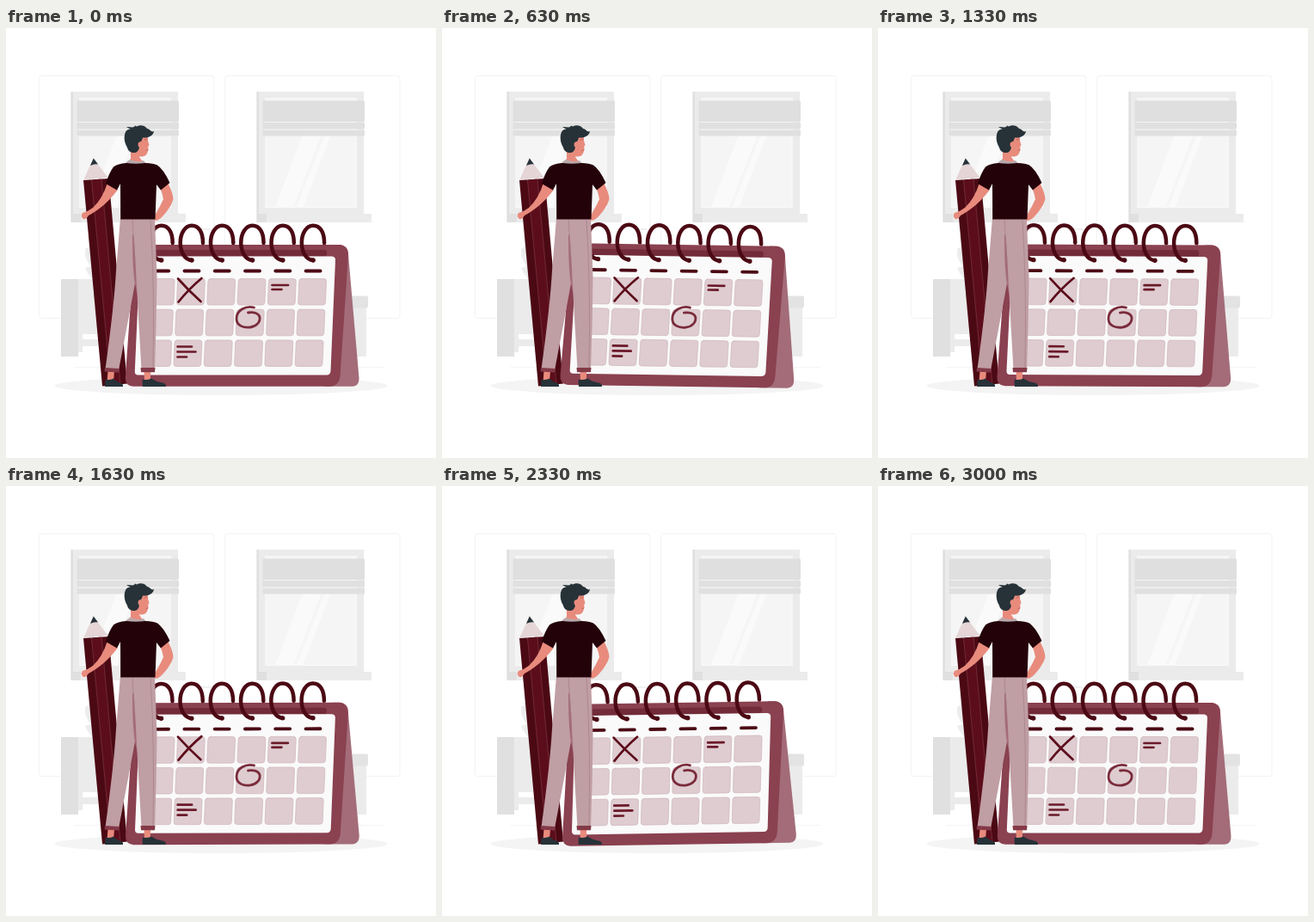
An HTML page with a canvas for the animation above (3040 ms loop, 500 by 500 pixels).

```html
<!DOCTYPE html>
<html lang="en">
<head>
<meta charset="utf-8">
<title>Desk calendar</title>
<style>
html, body { margin: 0; width: 100%; height: 100%; overflow: hidden; background: #fff; }
canvas { display: block; width: 500px; height: 500px; }
</style>
</head>
<body>
<canvas id="stage"></canvas>
<script>
const canvas = document.getElementById('stage');
const dpr = window.devicePixelRatio || 1;
canvas.width = canvas.height = 500 * dpr;
const ctx = canvas.getContext('2d');

const LOOP = 3040, SWING = 3, FPS = 24;
const DARK = '#4b0914', WINE = '#5c0d1b', BOARD = '#8a4150', SIDE = '#a36c78';
const PANTS = '#bf9ea4', SKIN = '#e88b7d', INK = '#263238', SHIRT = '#24020a';

function fill(d, color) {
  ctx.fillStyle = color;
  ctx.fill(new Path2D(d));
}

function line(d, color, width) {
  ctx.strokeStyle = color;
  ctx.lineWidth = width;
  ctx.stroke(new Path2D(d));
}

function box(x, y, w, h, color) {
  ctx.fillStyle = color;
  ctx.fillRect(x, y, w, h);
}

function round(x, y, w, h, r, color) {
  ctx.beginPath();
  ctx.roundRect(x, y, w, h, r);
  ctx.fillStyle = color;
  ctx.fill();
}

function drawWindow(x) {
  ctx.save();
  ctx.translate(x, 0);
  ctx.beginPath();
  ctx.roundRect(-37, 55.5, 203.5, 282, 3);
  ctx.strokeStyle = '#f3f3f3';
  ctx.lineWidth = 1;
  ctx.stroke();
  box(0, 74, 124.5, 142, '#ebebeb');
  box(0, 74, 2.5, 142, '#e0e0e0');
  box(0, 216, 133.5, 10, '#ebebeb');
  box(0, 216, 11.5, 10, '#e0e0e0');
  box(9.5, 81, 106.5, 128, '#f5f5f5');
  box(115, 81, 1, 128, '#fafafa');
  box(9.5, 208, 106.5, 1, '#fafafa');
  fill('M53 125H75L43 208H21.500Z', '#fafafa');
  fill('M79 125H86L54 208H46Z', '#fafafa');
  round(7, 84.5, 118.5, 24.5, 1.5, '#dfdfdf');
  round(7, 110, 118.5, 7.5, 1, '#e0e0e0');
  round(7, 118.7, 118.5, 6.8, 1, '#e0e0e0');
  ctx.restore();
}

function drawRoom() {
  box(0, 0, 500, 500, '#fff');
  drawWindow(75.5);
  drawWindow(291.5);

  fill('M92 257C97 254 106 256 110 260V292H101C97 289 94 284 92 279L98 277C95 272 93 268 92 265Z', '#ededed');
  box(84, 292, 34, 64, '#ebebeb');
  box(84, 362, 34, 8, '#ebebeb');
  box(84, 297, 5, 80, '#ebebeb');
  box(64, 292, 20, 90, '#e0e0e0');
  line('M226 234H238', '#ededed', 1.5);
  box(390, 325, 29, 57, '#ebebeb');
  round(388, 311.5, 33, 14, 2, '#e3e3e3');
  line('M80 394.5H440', '#f5f5f5', 1);

  ctx.beginPath();
  ctx.ellipse(250, 416, 193.5, 11, 0, 0, Math.PI * 2);
  ctx.fillStyle = '#f4f4f4';
  ctx.fill();
}

function drawPencil() {
  fill('M90 177L119.500 175L141 413.500L112 416.500Z', DARK);
  fill('M99.500 177L111 175.500L133 414.500L122 415.500Z', WINE);
  line('M99.500 177L122 415.500M111 175.500L133 414.500', '#7d3843', 0.7);
  fill('M101.500 151.500L90 177Q95 174.500 99.500 176.500Q105 173.500 111 175.500Q115 173 119.500 175Z', '#e5d5d7');
  fill('M101.800 151.500L98 160Q103 157.500 107 158.500Z', INK);
}

function drawCell(x, y) {
  const w = 31.8, h = 30.6;
  ctx.save();
  ctx.transform(1, 0, -0.044, 1, x, y);
  ctx.beginPath();
  ctx.roundRect(0, 0, w, h, 3);
  ctx.fillStyle = '#deccd0';
  ctx.fill();
  ctx.strokeStyle = '#cfb6bb';
  ctx.lineWidth = 0.7;
  ctx.stroke();
  ctx.restore();
}

function drawCalendar() {
  fill('M380 252H389Q396 253 398 263L410.500 407Q411 416 403 416.800H370Z', SIDE);
  fill('M158 252H388Q398.500 253 398 264L388.500 405Q387 416.500 376 416.800H148Q138 416 138.800 406L149 262Q150 252 158 252Z', BOARD);
  round(160, 258, 213, 7.5, 3, '#722b39');
  fill('M160 265.500H379Q383.300 266 383 270L377.500 399Q377 403.300 373 403.500H153Q149.500 403 149.800 399L155.500 270Q156 266 160 265.500Z', '#fafafa');

  for (let row = 0; row < 3; row++)
    for (let col = 0; col < 6; col++)
      drawCell(164.4 + col * 35.3 - row * 1.75, 291.5 + row * 35.7);

  line('M200 291.500Q213 306 226.500 318M227.500 291Q213 303 200.500 318.500', WINE, 2.7);
  line('M309.500 299H328M309.500 304H320.500', '#6b1a2a', 2.7);
  line('M199.500 370.500H216M199.500 376.500H220.500M199.500 382.500H210', '#6b1a2a', 2.7);
  line('M288.500 325C279 322.500 268 328 268 338C268 346 276 349 284 348C291 347 296 342 295 336C293.500 331 287 330 281.500 331', '#7a2b3b', 2.8);

  for (let i = 0; i < 6; i++) {
    ctx.save();
    ctx.translate(180.7 + i * 35.28, 0);
    line('M-8.500 282.500H8.500', DARK, 3.8);
    line('M13 250C13 237 8 229.700 0 229.700C-8 229.700 -13.300 239 -13.300 250C-13 261 -8 269.500 0 270', DARK, 4.5);
    ctx.beginPath();
    ctx.arc(0, 270, 2.7, 0, Math.PI * 2);
    ctx.fillStyle = DARK;
    ctx.fill();
    ctx.restore();
  }
}

function drawMan() {
  // feet
  fill('M118.500 399H126L125 411H117.500Z', SKIN);
  fill('M160.500 399H168V411H161Z', SKIN);
  fill('M116 408.500Q120 410 125 407.500Q128 411 135 413.500Q136.500 415 136 417H115Q114.500 412 116 408.500Z', INK);
  fill('M159 408.500Q164 410 169 407.500Q175 411.500 184 413Q186.500 414.500 186 417H159Q158 412 159 408.500Z', INK);

  // trousers
  fill('M133 221H158L152 286Q144 330 131 398L115.500 396.500Q126 320 128 282Z', PANTS);
  fill('M147 240L157 250L155 320L150 298Q147 280 147 240Z', SIDE);
  fill('M147 221H173L175.500 290Q175 345 173 397.500H157.500L151.500 292Q150 255 147 221Z', PANTS);
  line('M147 223L149.500 262M168 224Q173 300 171 396', '#a9828a', 0.8);
  fill('M115 395L131.500 396L131 400.500L114.500 399.500Z', '#843a48');
  fill('M156.500 395H173.500L173 400.300H157Z', '#843a48');

  // arms
  fill('M118 180L130 188Q120 201 111 208Q102 215 96 218Q93 223 90 222Q86 219 89 215Q96 213 101 209Q112 199 118 180Z', SKIN);
  fill('M179 185L188 180Q194 191 194.500 199Q192 208 183 218Q177 225 172.500 223.500L172 219Q176 214 183 199Q182 193 179 185Z', SKIN);

  // neck and face
  fill('M145 141L155 143V150L160 157H140L145 152Z', SKIN);
  fill('M154 124H163Q165.500 126 165 131L166.500 136L165.200 138L165.500 141L164 146Q161 151 154 149L149 143Z', SKIN);
  line('M161 130L164 129.500M163 142.500L165 142', '#b95d57', 0.8);
  fill('M138.500 158Q141 154 145 153Q153 157 160 154L163 158Z', '#b9a9ac');

  fill('M140 157Q151 158.500 162 157Q171 157 176 159.500Q183 164 190.500 180L180 188.500L175 182L173.500 222.500H133.200L133 181L129 188.500L116 181Q120 168 125 161.500Q130 157.500 140 157Z', SHIRT);

  // hair
  fill('M138 124C139 119 142 117 145 118L140 115C144 115 147 116 149 115L150 113.500L152 114.500C157 112 162 114 164 117C167 117 169 122 172 120C171 126 165 128 159 127.500C158 130 158 132 156 132.500C153 132 153 137 155 139C154 143 152 145 149 145C145 145 142 143 141 139C138 134 137 129 138 124Z', INK);
  fill('M155 133Q158 131 158.500 135Q158 139 155 139.500Z', SKIN);
}

// Linear rock: 0 to 1, to -1, back to 0 degrees
function tilt(p) {
  if (p < 0.25) return p * 4;
  if (p < 0.75) return 2 - p * 4;
  return p * 4 - 4;
}

function draw(now) {
  const step = Math.floor((now % LOOP + 5) * FPS / 1000);
  const phase = Math.min(step / FPS / SWING, 1);
  ctx.setTransform(dpr, 0, 0, dpr, 0, 0);
  ctx.lineCap = ctx.lineJoin = 'round';
  drawRoom();
  drawPencil();
  ctx.save();
  ctx.translate(274.5, 322);
  ctx.rotate(tilt(phase) * Math.PI / 180);
  ctx.translate(-274.5, -322);
  drawCalendar();
  ctx.restore();
  drawMan();
}

const start = performance.now();
function tick() {
  draw(performance.now() - start);
  requestAnimationFrame(tick);
}
tick();
</script>
</body>
</html>
```
